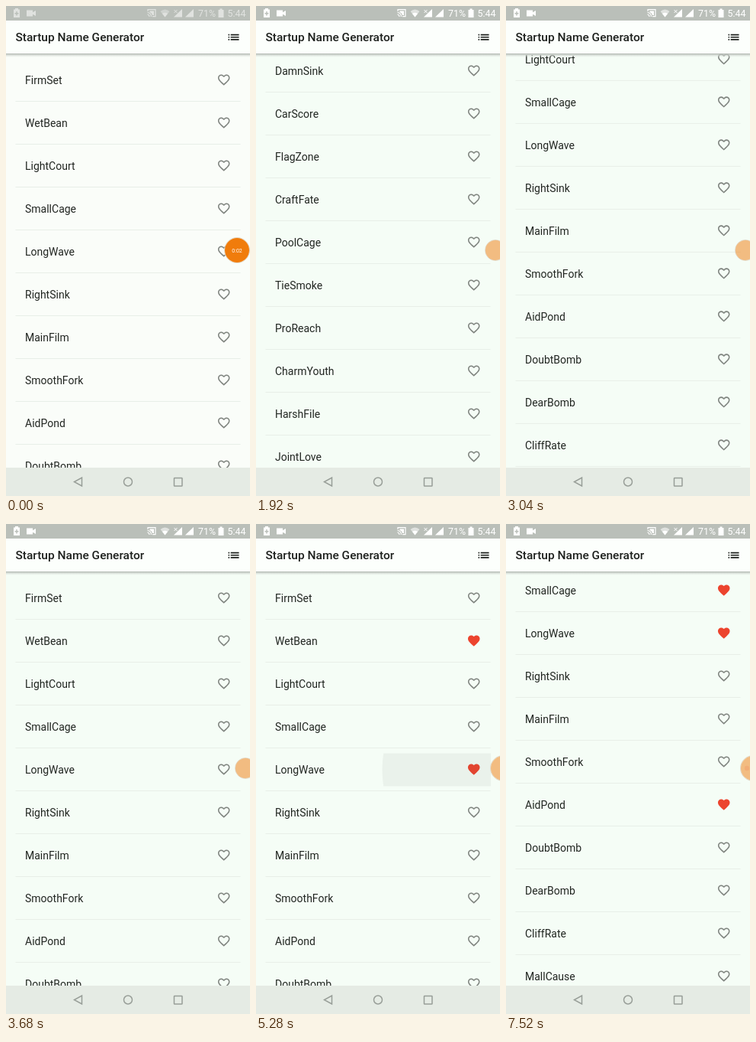
These frames come from a looping animation (320 by 640 pixels, 8000 ms). An HTML page:

```html
<!DOCTYPE html>
<html lang="en">
<head>
<meta charset="utf-8">
<title>Startup Name Generator</title>
<style>
  html, body { margin: 0; width: 100%; height: 100%; overflow: hidden; background: #f5fdf6; }
  svg { display: block; width: 100%; height: 100%; font-family: Roboto, sans-serif; }
  .name { font-size: 14px; fill: #222622; }
  .title { font-size: 15.5px; font-weight: 500; fill: #1d201d; }
  .status { font-size: 12.4px; fill: #fff; }
</style>
</head>
<body>
<svg viewBox="0 0 320 640" xmlns="http://www.w3.org/2000/svg">
  <defs>
    <path id="outline" d="M16.5 3c-1.74 0-3.41.81-4.5 2.09C10.91 3.81 9.24 3 7.5 3 4.42 3 2 5.42 2 8.5c0 3.78 3.4 6.86 8.55 11.54L12 21.35l1.45-1.32C18.6 15.36 22 12.28 22 8.5 22 5.42 19.58 3 16.5 3zm-4.4 15.55l-.1.1-.1-.1C7.14 14.24 4 11.39 4 8.5 4 6.5 5.5 5 7.5 5c1.54 0 3.04.99 3.57 2.36h1.87C13.46 5.99 14.96 5 16.5 5c2 0 3.5 1.5 3.5 3.5 0 2.89-3.14 5.74-7.9 10.05z"/>
    <path id="solid" d="M12 21.35l-1.45-1.32C5.4 15.36 2 12.28 2 8.5 2 5.42 4.42 3 7.5 3c1.74 0 3.41.81 4.5 2.09C13.09 3.81 14.76 3 16.5 3 19.58 3 22 5.42 22 8.5c0 3.78-3.4 6.86-8.55 11.54z"/>
    <clipPath id="tile"><rect x="13" y="-21.5" width="295" height="43"/></clipPath>
    <linearGradient id="shade" x2="0" y2="1">
      <stop stop-color="#aeb4ae"/>
      <stop offset=".45" stop-color="#cdd3cd" stop-opacity=".7"/>
      <stop offset="1" stop-color="#e4eae4" stop-opacity="0"/>
    </linearGradient>
  </defs>

  <rect id="page" width="320" height="640"/>
  <g id="list"></g>

  <rect y="62" width="320" height="5" fill="url(#shade)"/>
  <rect y="19" width="320" height="43" fill="#fcfffc"/>
  <text class="title" x="12.4" y="46.3">Startup Name Generator</text>
  <path transform="translate(289.2 31.4) scale(.778)" fill="#1d201d"
    d="M3 13h2v-2H3zm0 4h2v-2H3zm0-8h2V7H3zm4 4h14v-2H7zm0 4h14v-2H7zM7 7v2h14V7z"/>

  <rect width="320" height="19" fill="#babfb9"/>
  <g id="status" fill="#fff">
    <path fill-rule="evenodd" d="M10 4.5h2V3h4v1.500h2V15h-8zM13.300 7v2h-1.800v1.500h1.800v2h1.400v-2h1.800V9h-1.800V7z"/>
    <path d="M27 5.500h8v2.800l4-2.300v7l-4-2.300v2.800h-8z"/>
    <path fill="none" stroke="#fff" stroke-width="1.200" d="M186 7V4.600h10v9h-4M185.500 8.500q5 .5 5 5.500M185.500 11q2.500.5 2.500 3"/>
    <path d="M188.500 6.500h5.500v5.500h-2q-.5-3-3.500-4z"/>
    <path opacity=".55" d="M202.500 7q6-5 12 0l-6 7.500z"/>
    <path d="M205 10q3.500-2.500 7 0l-3.500 4.500z"/>
    <path d="M220 14.500L231 4v10.500z"/>
    <path stroke="#babfb9" d="M220.500 5l4 4m0-4l-4 4" stroke-width="0"/>
    <path fill="none" stroke="#fff" d="M220.500 5l4 4m0-4l-4 4"/>
    <path d="M235 14.500L246 4v10.500z"/>
    <path d="M278.500 5h2V3.500h3V5h2v10h-7z"/>
    <text class="status" x="252" y="14">71%</text>
    <text class="status" x="290.500" y="14">5:44</text>
  </g>

  <rect y="603" width="320" height="37" fill="#e5ebe4"/>
  <g fill="none" stroke="#989e98" stroke-width="1.500">
    <path d="M99.500 616v11L89.500 621.500z"/>
    <circle cx="160" cy="621.500" r="5.500"/>
    <rect x="220.500" y="616.500" width="10.500" height="10.500" rx=".5"/>
  </g>

  <g id="bubble">
    <circle id="halo" cy="319" fill="none" stroke="#e3d9c8" stroke-width="1"/>
    <circle id="disc" cy="319" fill="#f07c0c"/>
    <text id="timer" y="321.500" font-size="7" fill="#fff" text-anchor="middle"></text>
    <circle id="dot" cx="316" cy="319" r="3.200" fill="#f4553f"/>
  </g>
</svg>
<script>
const LOOP = 8000, ROW = 56, TOP = 97;
const names = `FirmSet WetBean LightCourt SmallCage LongWave RightSink MainFilm SmoothFork
  AidPond DoubtBomb DearBomb CliffRate MallCause PaintHost BlackBag RailBus ClerkLine HerbFog
  StraightRow FloorMouse ThickCoal WaistHome DamnSink CarScore FlagZone CraftFate PoolCage
  TieSmoke ProReach CharmYouth HarshFile JointLove`.split(/\s+/);

// row -> time of the tap
const taps = { 1: 4480, 4: 5000, 3: 5320, 8: 6950 };

// [time, offset, velocity per ms]
const scrollKeys = [
  [200, 0, 0], [1120, 722, .85], [1850, 1244, 0], [2250, 1244, 0], [3040, 140, -.9],
  [3400, 0, 0], [5700, 0, 0], [6080, 71, .35], [6450, 178, 0]
];
const bubbleX = [[0, 303], [1120, 305.5], [1400, 305.5], [1700, 314], [3700, 314], [4000, 324]];
const bubbleR = [[0, 16], [1120, 15], [1400, 15], [1700, 13], [3700, 13], [4000, 16]];
const bubbleFade = [[0, 1], [1400, 1], [1700, .5]];

const $ = id => document.getElementById(id);
const clamp = x => Math.max(0, Math.min(1, x));
const mix = (a, b, k) => a + (b - a) * k;
const blend = (a, b, k) => `rgb(${a.map((v, i) => Math.round(mix(v, b[i], k)))})`;

function set(el, attrs) {
  for (const key in attrs) el.setAttribute(key, attrs[key]);
  return el;
}

function add(parent, tag, attrs) {
  return parent.appendChild(set(document.createElementNS('http://www.w3.org/2000/svg', tag), attrs));
}

// Cubic Hermite curve; missing velocities count as rest
function track(keys, t) {
  if (t <= keys[0][0]) return keys[0][1];
  for (let i = 1; i < keys.length; i++) {
    const [t0, y0, v0 = 0] = keys[i - 1], [t1, y1, v1 = 0] = keys[i];
    if (t >= t1) continue;
    const d = t1 - t0, u = (t - t0) / d, w = 1 - u;
    return y0 * (1 + 2 * u) * w * w + v0 * d * u * w * w
      + y1 * u * u * (3 - 2 * u) - v1 * d * u * u * w;
  }
  return keys[keys.length - 1][1];
}

const rows = names.map((name, i) => {
  const g = add($('list'), 'g', { transform: `translate(0 ${TOP + i * ROW})` });
  const tap = taps[i];
  const ripple = tap && add(add(g, 'g', { 'clip-path': 'url(#tile)' }), 'circle', { cx: 306, cy: 0 });
  add(g, 'text', { class: 'name', x: 25, y: 5 }).textContent = name;
  const heart = add(g, 'use', { transform: 'translate(276.4 -9.9) scale(.778)' });
  add(g, 'rect', { x: 12.5, y: 27, width: 295, height: 1, fill: '#e8efe8' });
  return { tap, ripple, heart };
});

function drawRow({ tap, ripple, heart }, t) {
  const age = tap ? t - tap : -1, on = age >= 0;
  set(heart, {
    href: on ? '#solid' : '#outline',
    fill: on ? blend([80, 82, 80], [236, 68, 46], clamp(age / 300)) : '#808580'
  });
  if (ripple) set(ripple, {
    r: on ? age * .5 : 0,
    opacity: on ? .06 * clamp((460 - age) / 240) : 0
  });
}

function drawBubble(t) {
  const cx = track(bubbleX, t), r = track(bubbleR, t), fade = track(bubbleFade, t);
  set($('halo'), { cx, r: r + .5 });
  set($('disc'), { cx, r, opacity: fade });
  set($('timer'), { x: cx, opacity: clamp(fade * 2 - 1) }).textContent = '0:0' + (2 + Math.floor(t / 1000));
  const pulse = .5 + .5 * Math.cos((t - 6080) / 960 * 2 * Math.PI);
  set($('dot'), { opacity: t < 5700 ? 0 : mix(.15, .75, pulse) });
}

function draw(t) {
  const settle = clamp(t / 320);
  set($('page'), { fill: blend([250, 253, 249], [245, 253, 246], settle) });
  set($('status'), { opacity: mix(.55, 1, settle) });
  set($('list'), { transform: `translate(0 ${-track(scrollKeys, t).toFixed(2)})` });
  rows.forEach(row => drawRow(row, t));
  drawBubble(t);
}

const start = performance.now();
function tick() {
  draw((performance.now() - start) % LOOP);
  requestAnimationFrame(tick);
}
tick();
</script>
</body>
</html>
```
